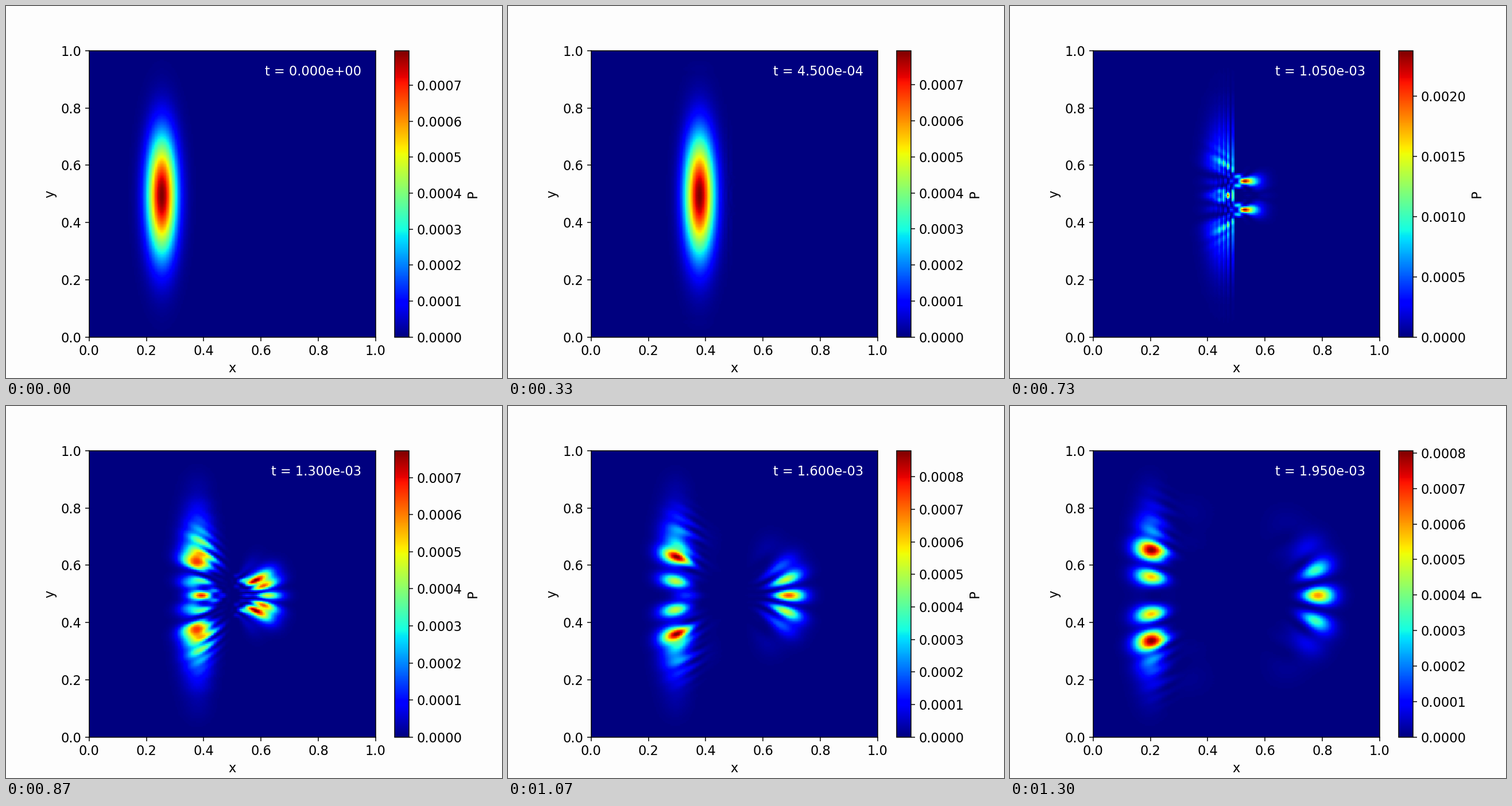
Write a matplotlib script that moves like this. It is 864 px wide and 648 px high and loops after 1.33 s.

```python
import numpy as np
import matplotlib.pyplot as plt
from matplotlib.animation import FuncAnimation

FRAMES = 40
LOOP_MS = 1330
STEPS_PER_FRAME = 2

# Grid and Crank-Nicolson step for i du/dt = -lap(u) + V u
H = 0.005
DT = 2.5e-5
N = 199
MID = 100  # row on the symmetry line y = 0.5
R = 0.5j * DT / H**2


def initial_wave(x, y):
    """Gaussian packet moving right, evaluated on the lower half plane."""
    envelope = -(x - 0.25)**2 / (2 * 0.05**2) - (y - 0.5)**2 / (2 * 0.2**2)
    return np.exp(envelope + 200j * (x - 0.25))


def double_slit():
    """Wall potential with two openings; only y <= 0.5 is stored."""
    col = np.abs(np.arange(N) - 100)[:, None]
    row = np.abs(np.arange(MID + 1) - MID)[None, :]
    is_open = (row >= 5) & (row <= 15)
    return np.where((col <= 2) & ~is_open, 1e10, 0.0)


def factorise(potential):
    """Block Thomas inverses, one block for each column of the grid."""
    size = MID + 1
    coupling = -R * (np.eye(size, k=1) + np.eye(size, k=-1))
    coupling[-1, -2] *= 2  # mirror at y = 0.5
    inverses = []
    for v in potential:
        block = np.diag(1 + 4 * R + 0.5j * DT * v) + coupling
        if inverses:
            block = block - R**2 * inverses[-1]
        inverses.append(np.linalg.inv(block))
    return inverses


def advance(u, inverses):
    """One step: u -> 2 A^-1 u - u."""
    w = np.empty_like(u)
    w[0] = inverses[0] @ u[0]
    for i in range(1, N):
        w[i] = inverses[i] @ (u[i] + R * w[i - 1])
    for i in range(N - 2, -1, -1):
        w[i] += R * (inverses[i] @ w[i + 1])
    return 2 * w - u


def density(u):
    """Probability on the whole square, rows along y."""
    half = np.abs(u.T)**2
    return np.vstack([half, half[-2::-1]])[:N]


def simulate():
    x = H * np.arange(N)[:, None]
    y = H * np.arange(MID + 1)[None, :]
    u = initial_wave(x, y)
    u /= np.sqrt(density(u).sum())
    inverses = factorise(double_slit())
    result = [density(u)]
    for _ in range(FRAMES - 1):
        for _ in range(STEPS_PER_FRAME):
            u = advance(u, inverses)
        result.append(density(u))
    return result


densities = simulate()

plt.rcParams.update({"font.family": "DejaVu Sans", "font.size": 12})
fig = plt.figure(figsize=(6.4, 4.8), dpi=135, facecolor="#fdfdfd")
ax = fig.add_subplot()
img = ax.imshow(densities[0], extent=[0, 1, 0, 1], cmap="jet",
                interpolation="nearest", vmin=0, vmax=densities[0].max())
ax.set_xlabel("x")
ax.set_ylabel("y")
cbar = fig.colorbar(img, ax=ax)
cbar.set_label("P")
clock = ax.text(0.95, 0.95, "", color="white", ha="right", va="top")


def update(frame):
    p = densities[frame]
    img.set_data(p)
    img.set_clim(0, p.max())
    clock.set_text(f"t = {frame * STEPS_PER_FRAME * DT:.3e}")
    return img, clock


anim = FuncAnimation(fig, update, frames=FRAMES, interval=LOOP_MS / FRAMES,
                     repeat=True, blit=False)
plt.show()
```
